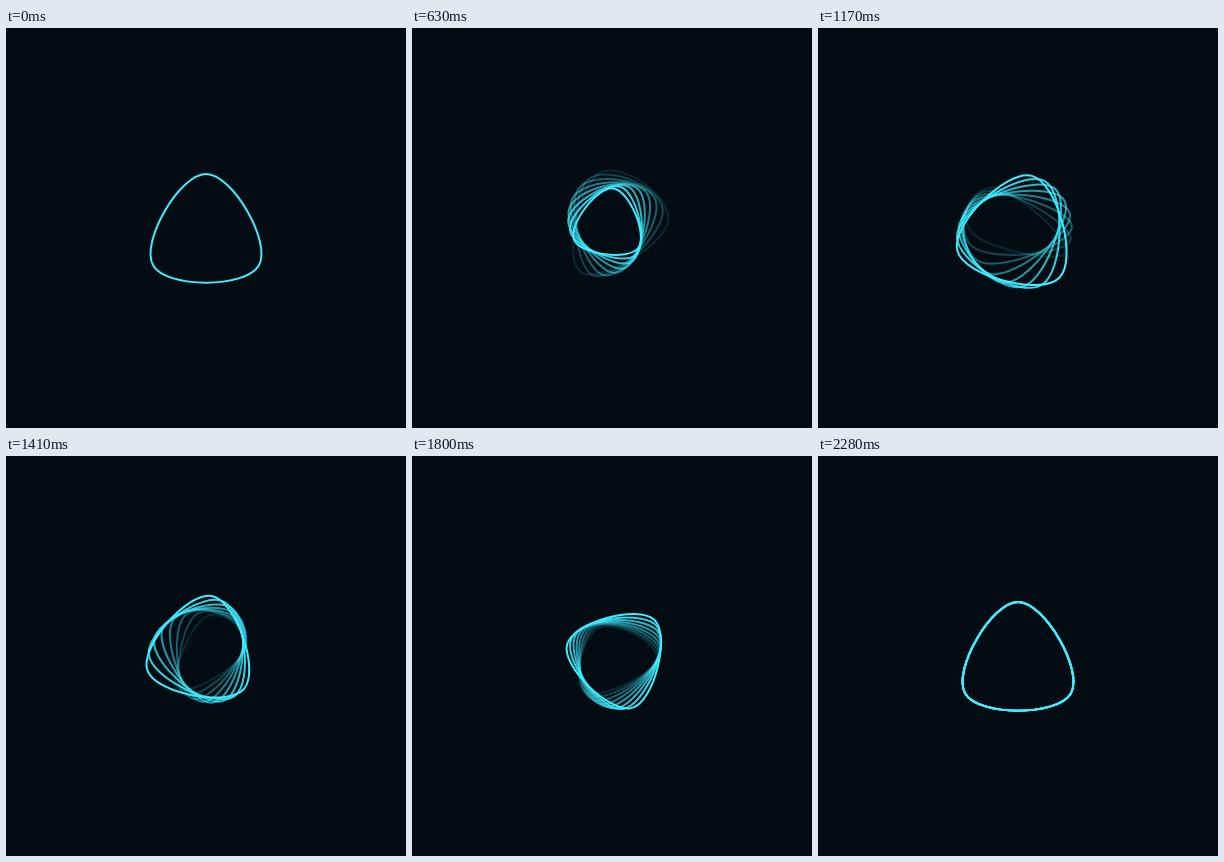
Recreate the animation shown at these times as an HTML page with a canvas. Size 400 by 400 pixels, loop 2.67 s.

```html
<!DOCTYPE html>
<html lang="en">
<head>
<meta charset="utf-8">
<title>Spinning loop</title>
<style>
  html, body { margin: 0; width: 100%; height: 100%; overflow: hidden; background: #030c13; }
  canvas { display: block; width: 400px; height: 400px; }
</style>
</head>
<body>
<canvas id="stage" width="400" height="400"></canvas>
<script>
const ctx = document.getElementById('stage').getContext('2d');
const LOOP = 2670, SPIN = 2280, STEP = 30, COPIES = 8;
const CENTER = 200, OFFSET = 7, RADIUS = 61, HANDLE = 26.5;

const mix = (a, b, f) => a + (b - a) * f;
const easeInOut = p => (1 - Math.cos(Math.PI * p)) / 2;
const hump = p => Math.sin(Math.PI * p) ** 2;

// Rounded triangle whose bounding box is centred on the pivot
function tracePath() {
  ctx.beginPath();
  ctx.moveTo(0, OFFSET - RADIUS);
  for (let n = 0; n < 3; n++) {
    const from = (n / 3) * 2 * Math.PI - Math.PI / 2, to = from + 2 * Math.PI / 3;
    const x = RADIUS * Math.cos(to), y = OFFSET + RADIUS * Math.sin(to);
    ctx.bezierCurveTo(
      RADIUS * Math.cos(from) - HANDLE * Math.sin(from),
      OFFSET + RADIUS * Math.sin(from) + HANDLE * Math.cos(from),
      x + HANDLE * Math.sin(to), y - HANDLE * Math.cos(to), x, y);
  }
  ctx.closePath();
}

// Fainter copies run ahead in the turn and narrow more than the bright one
function drawRing(time, index) {
  const p = Math.min(1, time / SPIN);
  const lead = Math.min(1, (time + index * STEP) / SPIN);
  const depth = index / (COPIES - 1);
  const pulse = hump(2 * p), late = p > 0.5;
  const brightDip = pulse * (late ? 0.15 : 0.4);
  const narrow = mix(brightDip, 0.53 * hump(p ** 1.2), depth);
  const shorten = mix(brightDip, late ? 0.45 * pulse : 0, depth);

  ctx.save();
  ctx.translate(CENTER, CENTER);
  ctx.rotate(4 * Math.PI * easeInOut(lead));
  ctx.scale(1 - narrow, 1 - shorten);
  tracePath();
  ctx.restore();
  ctx.globalAlpha = 1 - index / COPIES;
  ctx.stroke();
}

function draw(time) {
  ctx.globalAlpha = 1;
  ctx.fillStyle = '#030c13';
  ctx.fillRect(0, 0, 2 * CENTER, 2 * CENTER);
  ctx.strokeStyle = '#40ecff';
  ctx.lineWidth = 2;
  const count = time < STEP ? 1 : COPIES;
  for (let i = count - 1; i >= 0; i--) drawRing(time, i);
}

let start;
function tick(now) {
  if (start === undefined) start = now;
  const time = (now - start) % LOOP;
  draw(Math.floor(time / STEP) * STEP);
  requestAnimationFrame(tick);
}
draw(0);
requestAnimationFrame(tick);
</script>
</body>
</html>
```
